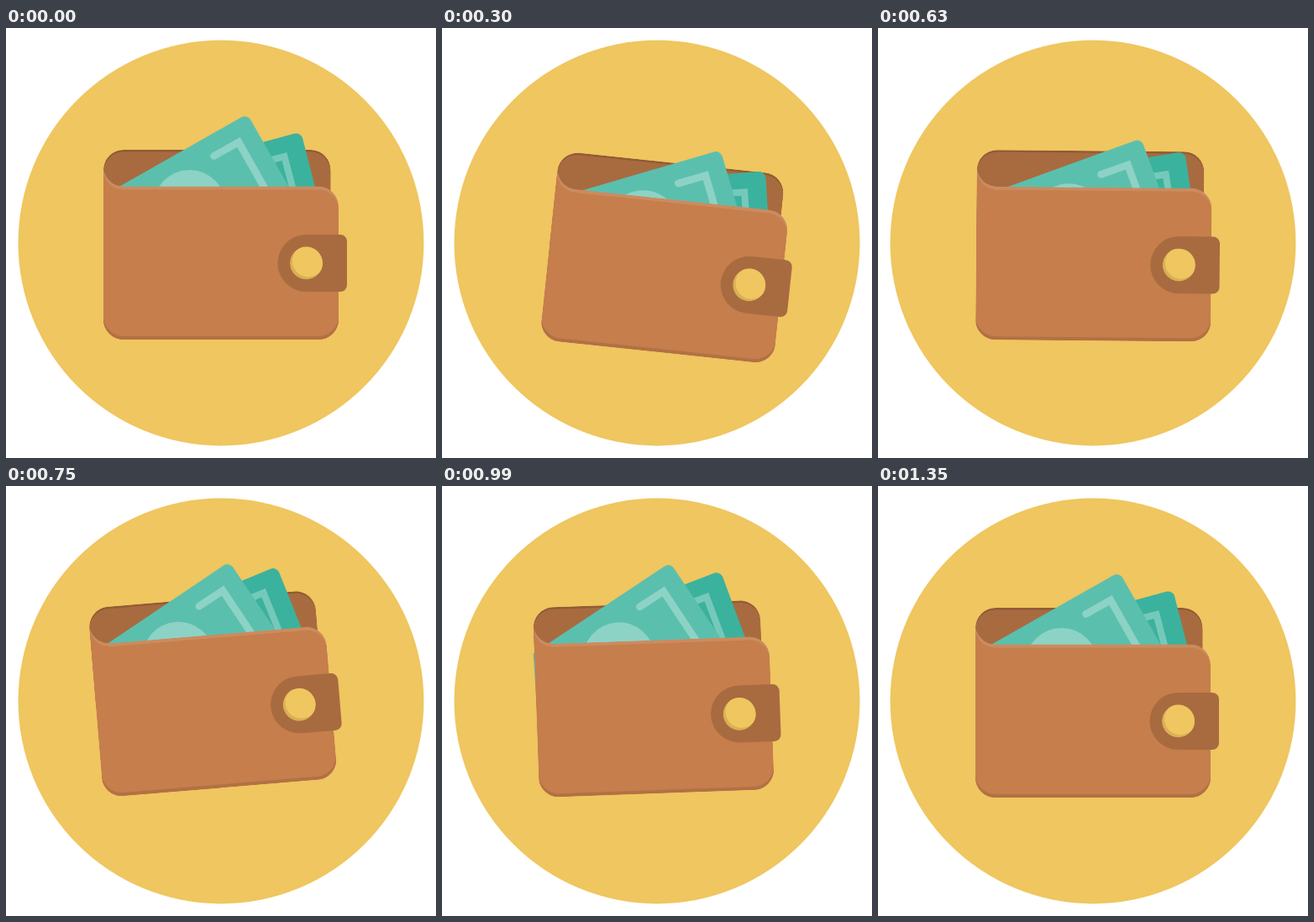
Animation, 512 px wide and 512 px high, one loop 2350 ms. Source, as an HTML page:

```html
<!DOCTYPE html>
<html lang="en">
<head>
<meta charset="utf-8">
<title>Wallet</title>
<style>
  html, body { margin: 0; width: 100%; height: 100%; overflow: hidden; background: #fff; }
  svg { display: block; width: 100%; height: 100%; }
</style>
</head>
<body>
<svg viewBox="0 0 512 512">
  <defs>
    <path id="front" d="M116 165A24 24 0 0 0 140 188.500H372A24 24 0 0 1 396 212.500V347A24 24 0 0 1 372 371H140A24 24 0 0 1 116 347Z"/>
    <path id="back" d="M116 169A24 24 0 0 1 140 145H362.500A24 24 0 0 1 386.500 169V260H116Z"/>
    <clipPath id="frontClip"><use href="#front"/></clipPath>
    <clipPath id="backClip"><use href="#back"/></clipPath>
    <clipPath id="buttonClip"><circle cx="357.500" cy="280" r="19.500"/></clipPath>
  </defs>

  <circle cx="256" cy="256" r="241.500" fill="#efc65f"/>

  <g id="wallet">
    <g clip-path="url(#backClip)">
      <use href="#back" fill="#925b35"/>
      <use href="#back" y="2.500" fill="#a86b40"/>
    </g>

    <g id="rearBill">
      <path fill="#3bb29d" d="M250 151L343.300 125.700A8 8 0 0 1 353.100 131.300L378 228V265H250Z"/>
      <path fill="none" stroke="#75c9bb" stroke-width="8" stroke-linecap="round" d="M308 159L331.500 153L350 224"/>
    </g>

    <g id="frontBill">
      <path fill="#5bbfae" d="M117 199L280.300 106.200A8 8 0 0 1 291.200 109.300L360 230V265H117Z"/>
      <circle cx="218.500" cy="212" r="43" fill="#8cd3c5"/>
      <path fill="none" stroke="#8cd3c5" stroke-width="8.700" stroke-linecap="round" d="M247.500 152.500L277 136L328 226"/>
    </g>

    <g clip-path="url(#frontClip)">
      <use href="#front" fill="#cc8b5f"/>
      <use href="#front" y="4" fill="#c57e4c"/>
      <path fill="#b27144" d="M116 343A24 24 0 0 0 140 367H372A24 24 0 0 0 396 343V371H116Z"/>
    </g>

    <path fill="#a86b40" d="M357.500 246H398A8 8 0 0 1 406 254V306A8 8 0 0 1 398 314H357.500A34 34 0 0 1 357.500 246Z"/>
    <g clip-path="url(#buttonClip)">
      <circle cx="357.500" cy="280" r="19.500" fill="#d9b054"/>
      <circle cx="360" cy="277.500" r="19" fill="#efc65f"/>
    </g>
  </g>
</svg>
<script>
  const LOOP = 2350, STEP = 30, END = 1350;
  const RISE = 385, FALL = 320, SETTLE = 400;

  // Every part tips to its peak, swings over to its dip, then settles at rest.
  const parts = [
    { id: "wallet", pivot: "116 371", peak: 6.9, dip: -5.1, rise: 0, fall: 463, settle: 763 },
    { id: "frontBill", pivot: "127 266", peak: 13.2, dip: -3, rise: 95, fall: 525, settle: 835 },
    { id: "rearBill", pivot: "127 266", peak: 10.4, dip: -4.7, rise: 115, fall: 505, settle: 885 }
  ];

  function ease(t, start, length) {
    const x = Math.min(1, Math.max(0, (t - start) / length));
    return x * x * (3 - 2 * x);
  }

  function angleAt(p, t) {
    const fall = ease(t, p.fall, FALL);
    return p.peak * (ease(t, p.rise, RISE) - fall) + p.dip * (fall - ease(t, p.settle, SETTLE));
  }

  const start = performance.now();

  function draw(now) {
    const elapsed = Math.max(0, now - start) % LOOP;
    const t = Math.min(END, Math.floor(elapsed / STEP) * STEP);
    for (const p of parts) {
      document.getElementById(p.id).setAttribute("transform", `rotate(${angleAt(p, t)} ${p.pivot})`);
    }
    requestAnimationFrame(draw);
  }
  draw(start);
</script>
</body>
</html>
```
